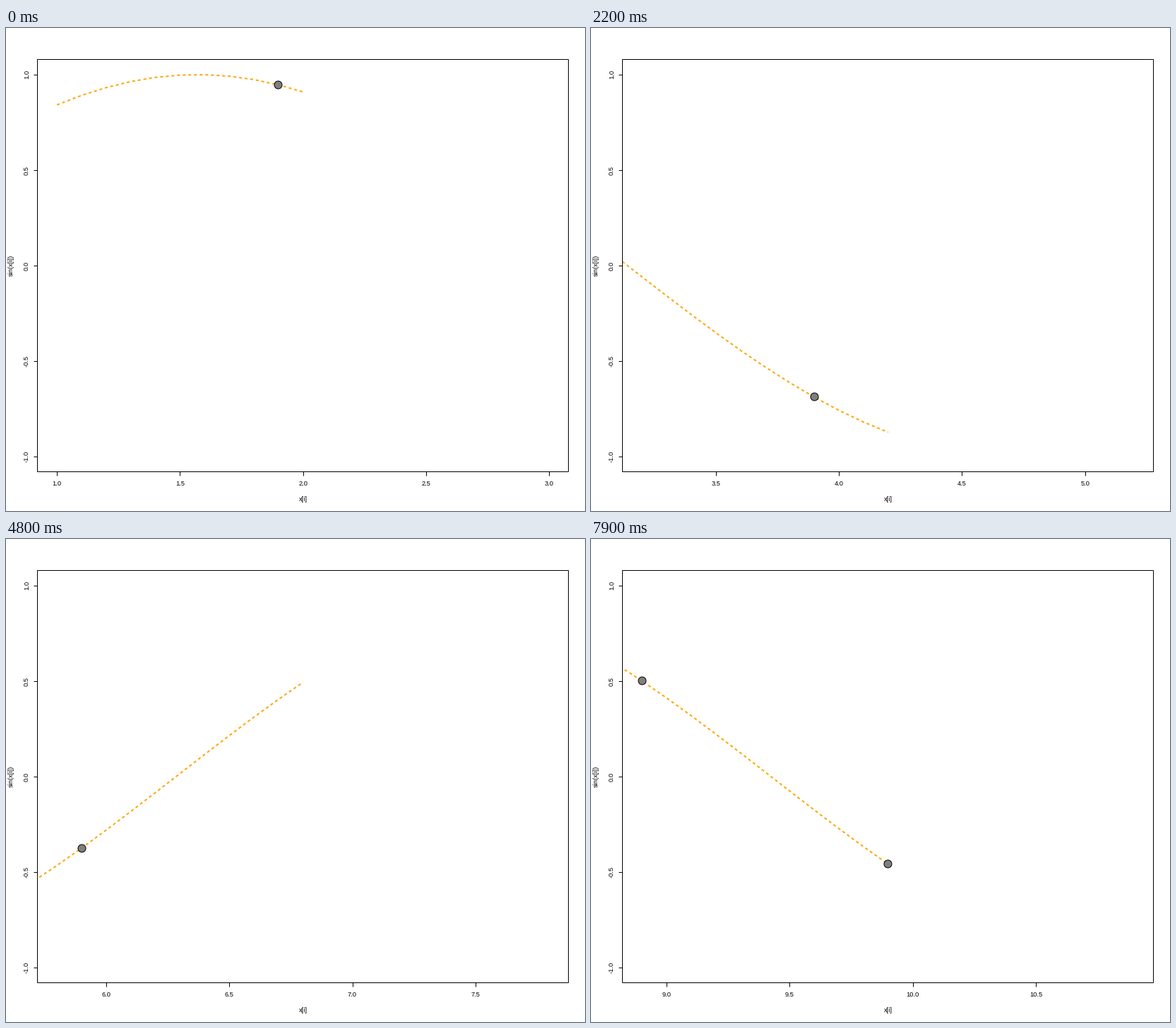
A matplotlib script that plays this animation: 820x683 px, repeating every 8 s.

```python
import numpy as np
import matplotlib.pyplot as plt
from matplotlib.animation import FuncAnimation
from matplotlib.patches import Rectangle

W, H, DPI = 820, 683, 64
PX = 72 / DPI                               # points per pixel
LEFT, TOP, RIGHT, BOTTOM = 44, 44, 796, 627
MID_X, MID_Y = 420.8, 336.1
UNIT_X, UNIT_Y = 348.63, 270.2
FRAMES = 80

plt.rcParams["font.family"] = "Liberation Sans"
plt.rcParams["font.size"] = 9.3 * PX

fig = plt.figure(figsize=(W / DPI, H / DPI), dpi=DPI, facecolor="white")
ax = fig.add_axes([0, 0, 1, 1])
ax.set_xlim(0, W)
ax.set_ylim(H, 0)
ax.axis("off")


def px_y(v):
    return MID_Y - UNIT_Y * v


def tick(xs=(0, 0), ys=(0, 0)):
    return ax.plot(xs, ys, color="black", lw=PX, solid_capstyle="butt")[0]


def label(x, y, s="", rotation=0):
    return ax.text(x, y, s, rotation=rotation, rotation_mode="anchor",
                   ha="center", va="baseline")


frame_box = Rectangle((LEFT, TOP), RIGHT - LEFT, BOTTOM - TOP, fill=False,
                      ec="black", lw=PX, joinstyle="miter", zorder=1)
ax.add_patch(frame_box)

for v in np.arange(-1, 1.1, 0.5):
    y = px_y(v)
    tick((LEFT - 5, LEFT), (y, y))
    label(32, y, f"{v:.1f}", 90)
label(10, MID_Y, "sin(x[i])", 90)
label(MID_X, 669, "x[i]")

x_ticks = [(tick(), label(0, 647)) for _ in range(5)]

curve, = ax.plot([], [], color="#ffa500", lw=2 * PX, ls=(0, (2, 2)),
                 dash_capstyle="butt", zorder=3)
dots, = ax.plot([], [], "o", ms=11 * PX, mfc="#7f7f7f", mec="black",
                mew=PX, zorder=4)
region = Rectangle((LEFT + 1, TOP + 1), RIGHT - LEFT - 1, BOTTOM - TOP - 1,
                   transform=ax.transData)
for art in (curve, dots):
    art.set_clip_path(region)


def update(k):
    n = 20 + k                              # newest x, in tenths
    head = n / 10

    def px_x(v):
        return MID_X + UNIT_X * (v - head)

    x = np.arange(10, n + 1) / 10
    y = np.sin(x)

    # dashes begin where the line enters the canvas
    start = max(1.0, head - MID_X / UNIT_X)
    xs = np.r_[start, x[x > start]]
    curve.set_data(px_x(xs), px_y(np.interp(xs, x, y)))

    # dots sit on whole pixels
    marks = x[9::10]
    dots.set_data(np.floor(px_x(marks)), np.floor(px_y(np.sin(marks))))

    shown = [t / 10 for t in range(n - 10, n + 11) if t % 5 == 0]
    for i, (line, text) in enumerate(x_ticks):
        visible = i < len(shown)
        line.set_visible(visible)
        text.set_visible(visible)
        if visible:
            p = px_x(shown[i])
            line.set_data((p, p), (BOTTOM, BOTTOM + 6))
            text.set_x(p)
            text.set_text(f"{shown[i]:.1f}")
    return []


anim = FuncAnimation(fig, update, frames=FRAMES, interval=100,
                     init_func=lambda: update(0), repeat=True,
                     repeat_delay=0, blit=False)
plt.show()
```
